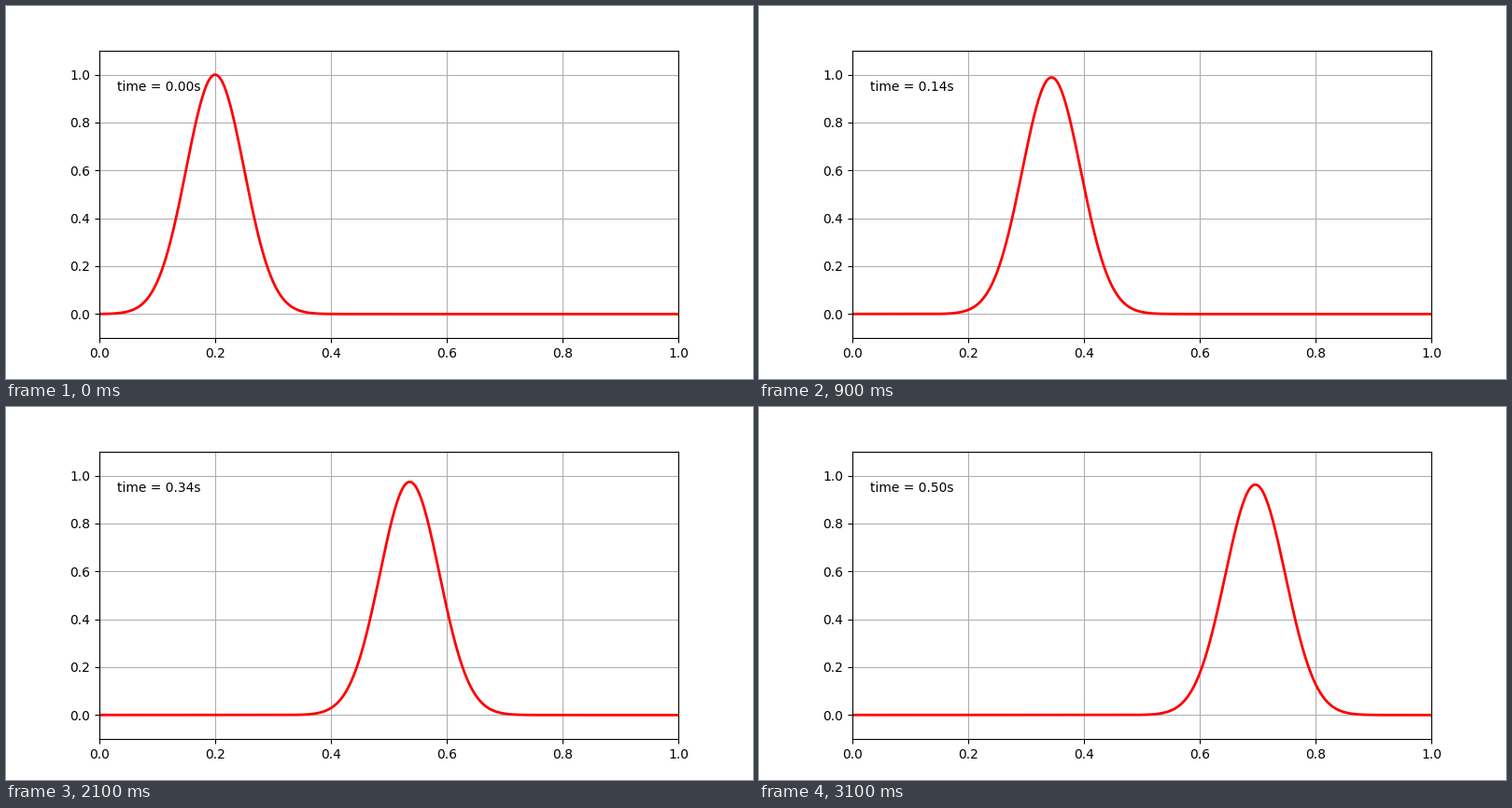
Write a matplotlib script that moves like this. It is 800 by 400 pixels and loops after 3200 ms.

```python
import numpy as np
import matplotlib.pyplot as plt
from matplotlib.animation import FuncAnimation

FRAMES = 32
STEPS = 10            # solver steps per frame
SPEED, COURANT = 1.0, 0.8

x = np.linspace(0, 1, 501)
dt = COURANT * (x[1] - x[0]) / SPEED


def solve():
    """Upwind advection of a Gaussian pulse, one row per frame."""
    u = np.exp(-0.5 * ((x - 0.2) / 0.05) ** 2)
    rows = [u.copy()]
    for _ in range(FRAMES - 1):
        for _ in range(STEPS):
            u[1:] -= COURANT * (u[1:] - u[:-1])
        rows.append(u.copy())
    return rows


waves = solve()

fig, ax = plt.subplots(figsize=(8, 4), dpi=100)
ax.set_xlim(0, 1)
ax.set_ylim(-0.1, 1.1)
ax.grid(True)
line, = ax.plot([], [], color="red", lw=2)
label = ax.text(0.03, 0.86, "", transform=ax.transAxes)


def draw(frame):
    line.set_data(x, waves[frame])
    label.set_text(f"time = {frame * STEPS * dt:.2f}s")
    return line, label


anim = FuncAnimation(fig, draw, frames=FRAMES, interval=100,
                     init_func=lambda: draw(0), repeat=True, repeat_delay=0)
plt.show()
```
